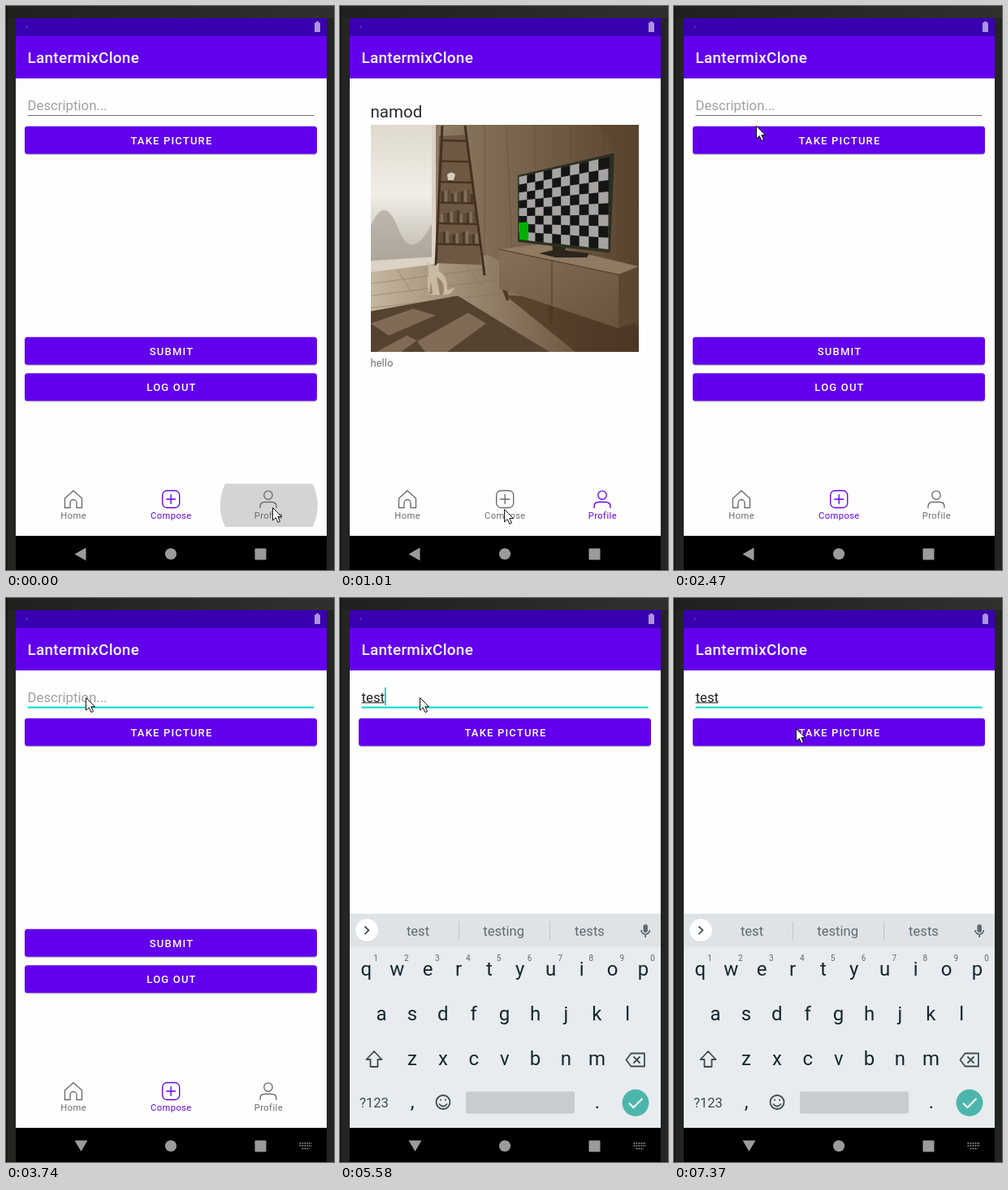
An HTML page that plays this animation: 404x693 px, repeating every 8 s.

```html
<!DOCTYPE html>
<html lang="en">
<head>
<meta charset="utf-8">
<title>Photo app</title>
<style>
html, body { margin: 0; height: 100%; overflow: hidden; background: #242422; }
svg { display: block; font-family: Roboto, "Open Sans", sans-serif; }
.mid text, text.mid { text-anchor: middle; }
.line { fill: none; stroke: currentColor; stroke-width: 1.35; stroke-linejoin: round; stroke-linecap: round; }
.btn text { font-size: 13.05px; font-weight: 500; letter-spacing: 1.16px; fill: #fff; text-anchor: middle; }
.tab { color: #6b6b6b; }
.tab.on { color: #6200ee; }
.tab text { font-size: 11.2px; letter-spacing: .4px; fill: currentColor; text-anchor: middle; }
.field { font-size: 16.8px; }
#keys text { font-size: 24px; fill: #14272e; text-anchor: middle; }
#keys .num { font-size: 10px; fill: #5c686e; }
.strip { color: #566166; font-size: 16.6px; fill: #5f6a70; }
</style>
</head>
<body>
<svg width="404" height="693" viewBox="0 0 404 693">
  <defs>
    <linearGradient id="wall"><stop offset="0" stop-color="#a08f79"/><stop offset=".45" stop-color="#7f6b55"/><stop offset="1" stop-color="#59432f"/></linearGradient>
    <linearGradient id="sky" x2="0" y2="1"><stop offset="0" stop-color="#e0dacd"/><stop offset=".5" stop-color="#f1eee7"/><stop offset="1" stop-color="#b9b1a5"/></linearGradient>
    <linearGradient id="floor"><stop offset="0" stop-color="#c5b6a0"/><stop offset=".5" stop-color="#8c7860"/><stop offset="1" stop-color="#523e2b"/></linearGradient>
    <linearGradient id="wood" x2="1" y2="1"><stop offset="0" stop-color="#85705a"/><stop offset="1" stop-color="#69533e"/></linearGradient>
    <linearGradient id="top"><stop offset="0" stop-color="#20201e"/><stop offset="1" stop-color="#30302e"/></linearGradient>
    <clipPath id="photoClip"><path d="M38 146H368V425H38z"/></clipPath>
    <clipPath id="tabClip"><path d="M12 587H395V640H12z"/></clipPath>
    <clipPath id="btnClip"><rect x="23" y="148" width="360" height="34" rx="3.5"/></clipPath>
  </defs>

  <path fill="#242422" d="M0 0H404V693H0z"/>
  <path fill="url(#top)" d="M0 0H404V15H0z"/>
  <path fill="#111" d="M0 0H1.5V693H0z"/>
  <path fill="#fefefe" d="M12 89H395V651H12z"/>
  <path fill="#3900b1" d="M12 15H395V37H12z"/>
  <path fill="#6200ee" d="M12 37H395V89H12z"/>
  <path fill="#aa94df" d="M380 20.5h1.8v-1.5h3.4v1.5h1.8v11.5h-7z"/>
  <circle cx="25.500" cy="25.500" r="1" fill="#7751ca"/>
  <text x="26.500" y="70.200" fill="#fff" font-size="18.900" font-weight="500" letter-spacing=".3">LantermixClone</text>

  <g id="compose">
    <text id="hint" class="field" x="26.500" y="127.500" fill="#a0a0a0">Description...</text>
    <text id="typed" class="field" x="26.500" y="127.500" fill="#222"></text>
    <path id="composing" stroke="#222"/>
    <path id="rule" d="M26.500 134.500H379.500"/>
    <path id="caret" fill="#03cdbb"/>
    <g id="buttons" class="btn"></g>
    <circle id="press" cx="151" cy="165" fill="#fff" clip-path="url(#btnClip)"/>
    <text id="pressLabel"/>
  </g>

  <g id="post">
    <text x="37.500" y="137" font-size="20.500" fill="#2b2b2b">namod</text>
    <g clip-path="url(#photoClip)">
      <path fill="url(#wall)" d="M38 146H368V425H38z"/>
      <path stroke="#4e3b2a" opacity=".35" d="M178 146V310M205 146L212 300M240 146V200M284 146V190M325 146V180M350 146V330"/>
      <path fill="#58442f" opacity=".5" d="M318 146H368V330L340 310V180z"/>
      <path fill="url(#floor)" d="M38 325L182 306 368 392V425H38z"/>
      <path stroke="#806e59" opacity=".5" d="M38 341L185 322M38 356L198 336M38 371L230 350M70 322L88 352M110 318L140 360M150 312L180 350"/>
      <path fill="url(#sky)" d="M38 146H116V313L38 318z"/>
      <path fill="#a59c91" opacity=".6" d="M38 270Q55 230 72 274T116 262V313L38 318z"/>
      <path fill="#dcd3c5" d="M113 146H118V316H113zM38 313L118 308V317L38 327z"/>
      <path fill="#6d5844" d="M122 160L156 158 174 318 119 316z"/>
      <g id="shelves"></g>
      <path fill="none" stroke="#43301f" stroke-width="3" d="M126 147L118 319M154 147L178 331"/>
      <path fill="#d8cdbb" d="M132 207q5-5 10 0l-2 7h-7z"/>
      <path fill="#554231" d="M38 375L145 356 258 425H38z"/>
      <path fill="#96826b" opacity=".65" d="M38 390L90 372 118 380 60 405zM95 412L158 377 180 390 132 425H105zM45 425L82 405 95 411 75 425z"/>
      <path fill="#483421" opacity=".75" d="M203 355L250 358 368 396V425H290z"/>
      <path fill="#c9baa4" d="M109 327l-1-12 5 4h4l5-3v10q11 6 10 23 7-1 9-4-2 11-16 10h-15q-4-13-1-28z"/>
      <path fill="#998672" d="M119 333q12 6 8 22h-4zM112 338l2 16h-4z"/>
      <path fill="#4d3926" d="M199 346l7-1 2 17h-3zM256 365h8l-3 26h-3zM338 392l8 2-3 24h-3zM359 380h6l-2 22h-3z"/>
      <path fill="#8f7a62" d="M196 299L250 292 368 320 343 330z"/>
      <path fill="url(#wood)" d="M196 299L343 330V396L196 347z"/>
      <path fill="#5c4733" d="M343 330L368 320V387L343 396z"/>
      <path stroke="#4c3827" fill="none" d="M261 313V368M196 299L343 330"/>
      <path fill="#2b251c" d="M261 291H276L278 300 307 304 304 309 266 309 245 304 262 300z"/>
      <path fill="#2c3021" d="M219 208L336 181q2 0 2 3L333 300q0 3-3 3L221 290q-2 0-2-3z"/>
      <path fill="#151515" d="M220.500 210L332 185.500 329.500 299 221 287z"/>
      <path id="checks" fill="#a5a4a3"/>
      <path fill="#00b000" d="M220.500 266L232 265.500V288L221 287z"/>
    </g>
    <text x="37.500" y="442.500" font-size="13.050" fill="#707070">hello</text>
  </g>

  <circle id="ripple" cy="613.500" r="60" clip-path="url(#tabClip)"/>
  <g class="tab" id="tab0">
    <path class="line" d="M72.500 605L83 595.500 93.500 605V616.500H87V610.500a4 4 0 0 0-8 0V616.500H72.500z"/>
    <text x="83.200" y="630.300">Home</text>
  </g>
  <g class="tab" id="tab1">
    <rect class="line" x="192.700" y="595.500" width="21" height="21" rx="5.500"/>
    <path class="line" d="M203.200 600.500v11M197.700 606h11"/>
    <text x="203.400" y="630.300">Compose</text>
  </g>
  <g class="tab" id="tab2">
    <circle class="line" cx="323" cy="601" r="5.200"/>
    <path class="line" d="M313 616.500V615q0-5.500 6-5.500h8q6 0 6 5.500v1.500"/>
    <text x="323.400" y="630.300">Profile</text>
  </g>

  <g id="keyboard">
    <path fill="#e8ecef" d="M12 388H395V651H12z"/>
    <path fill="#dfe3e6" d="M12 388H395V429H12z"/>
    <circle cx="33" cy="409" r="14" fill="#b7bcc0" opacity=".6"/>
    <circle cx="33" cy="408.300" r="14" fill="#fff"/>
    <path id="chevron" fill="none" stroke="#4c575d" stroke-width="1.900"/>
    <g class="strip">
      <g id="tools">
        <circle cx="83" cy="406.500" r="4.700" fill="none" stroke="#566166" stroke-width="1.900"/>
        <path stroke="#566166" stroke-width="2.200" d="M86.500 410L92 415.500"/>
        <path class="line" style="stroke-width:1.800" d="M136 402h10q2 0 2 2v6l-5 5h-7q-2 0-2-2v-9q0-2 2-2zM148 410h-3q-2 0-2 2v3M137.500 409q2 4 5 1M138 405.500v.1M144 405.500v.1"/>
        <text class="mid" x="196" y="412.500" font-size="11.500" font-weight="900" letter-spacing=".8">GIF</text>
        <rect x="246" y="402" width="14" height="14" rx="1"/>
        <path stroke="#c4c9cc" d="M287 399V419"/>
        <circle cx="315.500" cy="408.500" r="2"/><circle cx="321.500" cy="408.500" r="2"/><circle cx="327.500" cy="408.500" r="2"/>
      </g>
      <g id="words" class="mid">
        <text x="96" y="415"></text><text x="201.700" y="415"></text><text x="307.500" y="415"></text>
        <path stroke="#c0c5c9" d="M146.500 397.500V420M258.500 397.500V420"/>
      </g>
      <rect x="373.500" y="401" width="5.500" height="10" rx="2.750"/>
      <path fill="none" stroke="#566166" stroke-width="1.600" d="M371 408a5.200 5.200 0 0 0 10.400 0M376.200 413.500V417"/>
    </g>
    <g id="keys">
      <text x="42" y="626" style="font-size:16.500px;fill:#3c4a50">?123</text>
      <text x="89" y="627">,</text><text x="317" y="627">.</text>
    </g>
    <g color="#3f4c52">
      <path class="line" style="stroke-width:1.800" d="M42 557L51.500 567H46.500V576H37.500V567H32.500z"/>
      <path class="line" style="stroke-width:1.800" d="M358.500 559.500H375V575.500H358.500L352.500 567.500zM362 564l7 7M369 564l-7 7"/>
      <circle class="line" style="stroke-width:1.800" cx="127" cy="619.500" r="8.500"/>
      <path class="line" style="stroke-width:1.800" d="M122.500 622q4.500 5 9 0M124 616.500v.4M130 616.500v.4"/>
    </g>
    <rect x="155" y="606.500" width="134" height="27" rx="2" fill="#c8cccf"/>
    <circle cx="364" cy="620.300" r="16.500" fill="#4db6ac"/>
    <path fill="none" stroke="#fff" stroke-width="2" d="M356 620.500L361.500 626 372.500 615"/>
  </g>

  <path d="M12 651H395V693H12z"/>
  <g fill="#9b9b9b">
    <path id="back"/>
    <circle cx="203" cy="673.300" r="7"/>
    <rect x="306.500" y="666.500" width="14" height="14" rx="1"/>
    <path id="kbIcon" fill="none" stroke="#9b9b9b" stroke-width="1.700" stroke-dasharray="1.800 1.200" d="M361.500 670H377M361.500 673H377M364.500 676.500H374"/>
  </g>
  <path id="mouse" fill="#fff" stroke="#111" d="M.5.5V16L4.200 12.600 7 18.500 9.500 17.300 6.800 11.600H11.500z"/>
</svg>

<script>
const $ = id => document.getElementById(id);
const show = (id, on) => $(id).style.display = on ? '' : 'none';
const set = (id, attrs) => { for (const k in attrs) $(id).setAttribute(k, attrs[k]); };
const within = (t, spans) => spans.some(([a, b]) => t >= a && t < b);
// last entry [time, ...values] whose time has been reached
const at = (t, steps) => steps.filter(s => s[0] <= t).pop();

const button = (y, label) => `
  <rect x="23" y="${y + 1.3}" width="360" height="34" rx="3.5" fill="#000" opacity=".22"/>
  <rect x="23" y="${y}" width="360" height="34" rx="3.5" fill="#6200ee"/>
  <text x="204" y="${y + 21.7}">${label}</text>`;
$('buttons').innerHTML = button(147.8, 'TAKE PICTURE') + button(406.8, 'SUBMIT') + button(451.3, 'LOG OUT');

const row = (chars, x, y, numbers) => [...chars].map((c, i) =>
  `<text x="${x + i * 37.9}" y="${y}">${c}</text>` +
  (numbers ? `<text class="num" x="${44 + i * 37.9}" y="446">${(i + 1) % 10}</text>` : '')).join('');
$('keys').innerHTML += row('qwertyuiop', 32.3, 464, true) + row('asdfghjkl', 51, 519) + row('zxcvbnm', 89, 574);

// bookshelf: each board with a run of uneven books above it
let shelves = '';
for (let i = 0; i < 6; i++) {
  const y = 165 + i * 25.5, left = 125 - i * 1.1, right = 157 + i * 3.4;
  if (i > 2) for (let x = left + 3, k = 0; x < right - 4; x += 4, k++) {
    const h = 11 + (k * 7 + i * 3) % 6;
    shelves += `<path fill="${['#4b3928', '#806d59', '#5e4a38'][(k + i) % 3]}" d="M${x} ${y - h}h3.5v${h}h-3.5z"/>`;
  }
  shelves += `<path stroke="#463321" stroke-width="2.6" d="M${left} ${y}L${right} ${y + 1}"/>`;
}
$('shelves').innerHTML = shelves;

// checkerboard on the tilted screen, columns widening to the right
const screenPoint = (c, r) => {
  const u = c / 10 * (.88 + .12 * c / 10), v = r / 8;
  const top = 210 - 24.5 * u, bottom = 287 + 12 * u;
  return `${(220.5 + 110 * u).toFixed(1)} ${(top + (bottom - top) * v).toFixed(1)}`;
};
let checks = '';
for (let c = 0; c < 10; c++)
  for (let r = c % 2; r < 8; r += 2)
    checks += `M${screenPoint(c, r)}L${screenPoint(c + 1, r)} ${screenPoint(c + 1, r + 1)} ${screenPoint(c, r + 1)}z`;
set('checks', { d: checks });

const mouse = [
  [0, 328, 616], [620, 290, 617], [760, 252, 617], [890, 218, 617], [1010, 202, 618],
  [1800, 148, 520], [1950, 142, 440], [2070, 195, 325], [2190, 167, 243], [2340, 121, 175],
  [2470, 101, 147], [2610, 100, 133], [2730, 98, 122], [6480, 118, 133], [6630, 140, 150], [6760, 150, 160]];
const ripples = [
  [0, 323.8, .165], [120, 323.8, .12], [260, 323.8, .06], [380, 0, 0],
  [1420, 203.3, .165], [1540, 203.3, .1], [1660, 0, 0]];
const typing = [[0, '', 26], [4730, 't', 32.3], [4970, 'te', 41], [5220, 'tes', 49.5], [5460, 'test', 55]];
const suggestions = [
  [0], [4850, 'to', 'the', 'thanks'], [4970, 'te', 'tell', 'team'],
  [5340, 'tes', 'test', 'tests'], [5580, 'test', 'testing', 'tests']];
const slide = [[0, 270], [3860, 110], [3980, 0]];
const press = [[0, 0, 0], [7010, 70, .2], [7130, 240, .2], [7250, 240, .1], [7370, 0, 0]];
const caretOn = [[3000, 3620], [3980, 4480], [4730, 5980], [6480, 7010]];

function draw(t) {
  const profile = t >= 120 && t < 1540, focus = t >= 2860, keys = t >= 3740;
  show('compose', !profile);
  show('post', profile && t >= 380);
  [0, 1, 2].forEach(i => $('tab' + i).classList.toggle('on', i === (profile ? 2 : 1)));

  const [, rx, ra] = at(t, ripples);
  set('ripple', { cx: rx, opacity: ra, fill: '#000' });

  const [, text, end] = at(t, typing);
  $('typed').textContent = text;
  show('hint', !text);
  set('composing', { d: text ? `M26.5 128.8H${end - .6}` : '' });
  set('rule', { stroke: focus ? '#03dac5' : '#757575', 'stroke-width': focus ? 1.9 : 1 });
  set('caret', { d: within(t, caretOn) ? `M${end} 110h1.8v22h-1.8z` : '' });

  const [, pr, pa] = at(t, press);
  set('press', { r: pr, opacity: pa });

  show('keyboard', t >= 3860);
  set('keyboard', { transform: `translate(0 ${at(t, slide)[1]})` });
  const words = at(t, suggestions).slice(1), some = words.length > 0;
  show('tools', !some);
  show('words', some);
  $('words').querySelectorAll('text').forEach((w, i) => w.textContent = words[i] || '');
  set('chevron', { d: some ? 'M30.5 403.5L35.3 408.3 30.5 413.1' : 'M35.5 403.5L30.7 408.3 35.5 413.1' });

  set('back', { d: keys ? 'M84.5 666.5H100.5L92.5 680z' : 'M98.500 665.500V681.500L84.500 673.500z' });
  show('kbIcon', keys);
  const [, mx, my] = at(t, mouse);
  set('mouse', { transform: `translate(${mx} ${my})` });
}

function tick() {
  draw(performance.now() % 8000);
  requestAnimationFrame(tick);
}
tick();
</script>
</body>
</html>
```
